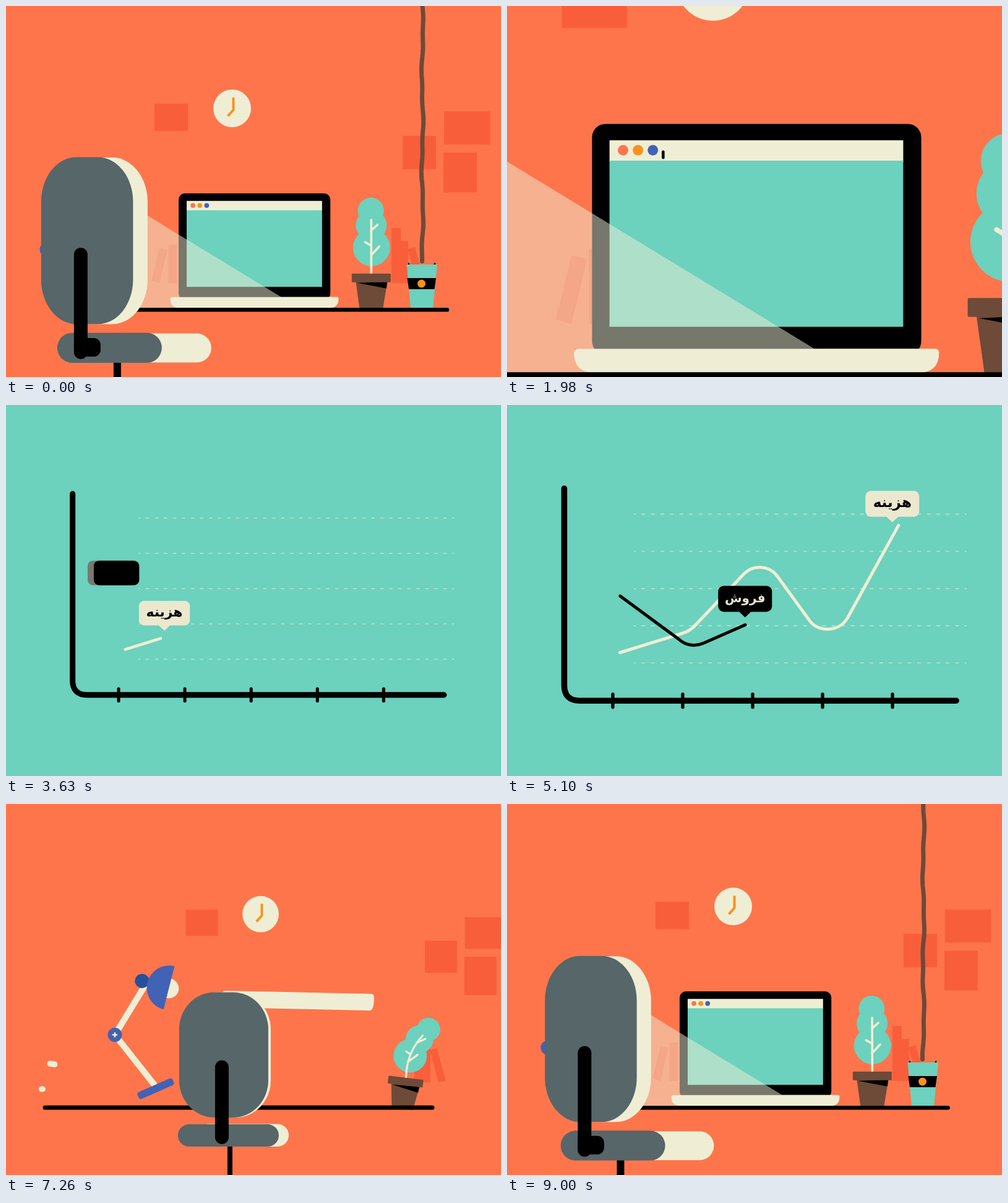
These frames come from a looping animation (800 by 600 pixels, 9030 ms). An HTML page:

```html
<!DOCTYPE html>
<html lang="fa">
<head>
<meta charset="utf-8">
<title>Desk and chart</title>
<style>
html, body { margin: 0; width: 100%; height: 100%; overflow: hidden; background: #fe754b; }
svg { display: block; width: 100vw; height: 100vh; }
text { font-family: "DejaVu Sans", "Noto Sans", sans-serif; font-weight: bold; text-anchor: middle; direction: rtl; }
.line { fill: none; stroke-linecap: round; stroke-linejoin: round; }
</style>
</head>
<body>
<svg id="stage" viewBox="0 0 800 600" preserveAspectRatio="none"></svg>
<script>
const LOOP = 9030;
const C = { wall: '#fe754b', red: '#f95e3b', teal: '#6cd1bd', cream: '#efeed5', label: '#ebe8cf',
  grey: '#566669', brown: '#6e4a38', blue: '#4262b5', navy: '#274f9b', amber: '#f7931e', black: '#000' };

const clamp = v => Math.max(0, Math.min(1, v));
const mix = (a, b, u) => a + (b - a) * u;
const span = (t, a, b) => clamp((t - a) / (b - a));
const easeInOut = u => u < .5 ? 2 * u * u : 1 - 2 * (1 - u) ** 2;
const easeOut = u => 1 - (1 - u) ** 3;
const backOut = u => 1 + 2.7 * (u - 1) ** 3 + 1.7 * (u - 1) ** 2;

const rect = (x, y, w, h, fill, r = 0, more = '') =>
  `<rect x="${x}" y="${y}" width="${w}" height="${h}" rx="${r}" fill="${fill}" ${more}/>`;
const circle = (x, y, r, fill) => `<circle cx="${x}" cy="${y}" r="${r}" fill="${fill}"/>`;
const poly = (points, fill, more = '') => `<polygon points="${points}" fill="${fill}" ${more}/>`;
const line = (d, color, w, more = '') => `<path class="line" d="${d}" stroke="${color}" stroke-width="${w}" ${more}/>`;
const group = (id, body = '') => `<g id="${id}">${body}</g>`;

const wall = rect(240, 158, 54, 44, C.red) + rect(641, 210, 54, 54, C.red) +
  rect(708, 170.5, 74.5, 53.5, C.red) + rect(707, 237, 54, 64.5, C.red) +
  circle(365.5, 165.5, 30.5, C.cream) + line('M367.5 148V168L358.5 178', C.amber, 4, 'style="stroke-linecap:butt"') +
  poly('248,391 261,394 248,448 235,444', C.red) + rect(262.5, 385.5, 13.5, 62.5, C.red) +
  rect(284.5, 370, 16, 78, C.red) + rect(623, 359, 15, 89, C.red) + rect(638, 380, 12, 68, C.red) +
  poly('649,393 661,390 676,445 664,448', C.red);

const lid = rect(279, 303, 245.2, 172, C.black, 10) + rect(292, 315.2, 218.8, 16, C.cream) +
  rect(292, 330.4, 218.8, 123.8, C.teal) +
  circle(302.1, 322.6, 3.9, C.wall) + circle(313.2, 322.6, 3.9, C.amber) + circle(324.3, 322.6, 3.9, C.blue);

const cup = poly('649.5,418 650.5,414.5 653,418', C.black) + poly('691,418 693.5,414.5 694.5,418', C.black) +
  poly('647.5,418 697,418 690,489 654,489', C.teal) +
  poly('648.5,440 695,440 692.5,458 651,458', C.black) + circle(671.5, 449, 6.5, C.amber);

// Rounded tray with separate top and bottom corner radii
function tray(x1, y1, x2, y2, top, bottom) {
  return `M${x1 + top} ${y1}H${x2 - top}Q${x2} ${y1} ${x2} ${y1 + top}Q${x2} ${y2} ${x2 - bottom} ${y2}` +
    `H${x1 + bottom}Q${x1} ${y2} ${x1} ${y1 + top}Q${x1} ${y1} ${x1 + top} ${y1}Z`;
}

const tag = (id, word, size, fill, ink) => group(id,
  rect(-43.5, -51, 87, 42, fill, 9, `id="${id}Box"`) +
  `<g id="${id}Text">${poly('-10.5,-10 10.5,-10 0,0', fill)}<text y="-24.5" font-size="${size}" fill="${ink}">${word}</text></g>`);

const costPath = 'M182.5 400.5L284 369C292 366.5 297 364 303 357.5L383 273C398 258 424 259 437 277' +
  'L490 350C503 367 536 368 550 345L635 190.5';
const salesPath = 'M183 309L278 379C287 387.5 302 392 318 385L384 356C400 349 414 348 427 360' +
  'L513 434C522 440.5 526 441.5 537 443L635 457';

const chart =
  group('grid', [176.5, 236.6, 296.8, 357, 417.2].map(y =>
    line(`M205 ${y}H743`, C.cream, 1.8,
      'stroke-opacity=".5" stroke-dasharray="6.4 8.97" stroke-dashoffset="3.2" style="stroke-linecap:butt"')).join('')) +
  line('M92.5 135V453.2Q92.5 478.2 117.5 478.2H726', C.black, 9.6, 'id="axis"') +
  [0, 1, 2, 3, 4].map(i => line('', C.black, 5.3, `id="tick${i}"`)).join('') +
  line(costPath, C.cream, 5, 'id="cost"') + line(salesPath, C.black, 5, 'id="sales"') +
  rect(0, 0, 0, 42, '#777a70', 9, 'id="ghost"') +
  tag('costTag', 'هزینه', 23, C.label, C.black) + tag('salesTag', 'فروش', 20, C.black, C.label);

document.getElementById('stage').innerHTML =
  rect(0, 0, 800, 600, C.wall) + group('wall', wall) +
  group('world',
    group('lid', lid) + group('plant') + line('', C.brown, 7, 'id="pour"') + group('cup', cup) + group('lamp') +
    `<path id="base" fill="${C.cream}"/>`) +
  rect(0, 0, 0, 0, C.teal, 0, 'id="panel"') + group('chart', chart) +
  poly('150,291 444.5,470.5 266,470.5 267,480 277,489 100,489', C.cream, 'id="light"') +
  line('', C.black, 6, 'id="desk"') + group('bits') + group('chair');

const el = {};
document.querySelectorAll('[id]').forEach(node => el[node.id] = node);
const set = (id, attrs) => { for (const k in attrs) el[id].setAttribute(k, attrs[k]); };
const show = (id, on) => el[id].style.display = on ? '' : 'none';
const lengths = { axis: 0, cost: 0, sales: 0 };
for (const id in lengths) lengths[id] = el[id].getTotalLength();

function reveal(id, u) {
  const len = lengths[id];
  show(id, u > 0);
  set(id, { 'stroke-dasharray': `${len * u} ${len + 20}` });
}

// Slow drift, then the dolly into the laptop screen
const zoomAt = t => t > 6000 ? 1 : Math.exp(.012 * clamp(t / 600) + 1.427 * easeInOut(span(t, 620, 3250)));
const chartScaleAt = t => t < 3250 ? zoomAt(t) / 4.515 : 1 + (t - 5100) * 3.57e-5;
const panAt = t => t < 6080 ? 0 : 218.7 * ((t - 6080) / 610) ** 2.4;
const about = (x, y, s) => `translate(${x * (1 - s)} ${y * (1 - s)}) scale(${s})`;

function drawWall(t, zoom) {
  let s, slide = 0;
  if (t < 6000) s = 1 / (1 - (1 - 1 / zoom) / 1.109);
  else {
    s = 1 - (LOOP - t) * 2.04e-5;
    slide = 498 * Math.exp(-(t - 6690) / 237);
  }
  set('wall', { transform: `translate(${slide} ${Math.min(5, slide * .11)}) ${about(400, 378, s)}` });
}

function drawPlant(t) {
  const arriving = t > 6000;
  const age = t - 7260;
  const far = arriving ? Math.exp(-age / 200) : 0;
  const sway = arriving ? Math.min(1, Math.exp(-age / 350)) * (age > 0 ? Math.cos(age / 110) : 1) : 0;
  const bend = .0044 * sway;
  const s = 1 - .1 * Math.min(1, far);
  const at = (x, h) => [x * s + bend * (h * s) ** 2, -h * s * (1 - .37 * Math.abs(bend) * h * s)];
  const leaf = (x, h, r) => circle(...at(x, h), r * s, C.teal);
  const twig = (...pts) => line('M' + pts.map(p => at(...p).join(' ')).join('L'), C.cream, 3.6 * s);
  const stem = [0, 15, 30, 45, 60, 75, 87].map(h => [0, h]);
  const pot = `<g transform="scale(${s})">` + poly('-25,13 26,13 19,56 -19,56', C.brown) +
    poly('-23,15 26,13 24.5,24', C.black) + rect(-31.5, 0, 63, 14, C.brown, 1) + '</g>';
  el.plant.innerHTML = `<g transform="translate(${590.3 + 56.5 * far} ${432.8 + 10 * Math.min(1, far)})">` +
    leaf(-.7, 102, 21) + leaf(0, 78, 25) + leaf(.5, 42, 30) + twig(...stem) +
    twig([0, 70], [10, 79]) + twig([0, 45], [-10, 51]) + twig([0, 30], [13, 44]) +
    `<g transform="rotate(${7 * sway})">${pot}</g></g>`;
}

function drawLaptop(t) {
  const landing = t > 6000;
  const fall = landing ? span(t, 7260, 7470) ** 2 : 1;
  const near = landing ? easeOut(span(t, 7260, 7560)) : 1;
  const y = landing && t < 7260 ? 318 - (7260 - t) * 1.2 : mix(318, 479.5, fall);
  const x = mix(473, 401.5, near);
  set('base', {
    d: tray(-136, -9, 136, 9, mix(5, 3, near), mix(7, 16, near)),
    transform: `translate(${x} ${y}) rotate(${1.2 * (1 - fall)}) scale(${mix(.9, 1, near)} ${mix(1.5, 1, near)})`
  });
  const open = landing ? backOut(span(t, 7480, 7860)) : 1;
  show('lid', open > 0);
  set('lid', { transform: `translate(0 473) scale(1 ${open}) translate(0 -473)` });
}

function drawLamp(t) {
  const slide = t < 6000 ? 1 : span(t, 7260, 8600);
  const land = t < 6000 ? 1 : backOut(span(t, 7260, 7620));
  const drop = t > 6000 && t < 7260 ? -(7260 - t) * 1.6 : 0;
  const jx = mix(176, 66, slide), jy = mix(373, 394, land) + drop;
  const bx = jx + 66, by = jy + mix(87, 89, land);
  const hx = jx + mix(87.5, 92, land), hy = jy - 76;
  el.lamp.innerHTML =
    line(`M${hx - 40} ${hy - 2}L${jx} ${jy}L${bx - 2} ${by - 6}`, C.cream, 10) +
    `<g transform="translate(${bx} ${by}) rotate(${mix(-24, 0, land)})">${rect(-31, -6, 62, 12, C.blue, 4)}</g>` +
    `<g transform="translate(${hx} ${hy}) rotate(${mix(14, 30, land)})">` +
    circle(-45, 0, 11.5, C.navy) + circle(0, 1, 16, C.cream) +
    `<path d="M0 -36A36 36 0 0 0 0 36Z" fill="${C.blue}"/></g>` +
    circle(jx, jy, 11.5, C.blue) + line(`M${jx - 3} ${jy}h6M${jx} ${jy - 3}v6`, C.cream, 2.5);
}

function drawCup(t) {
  const grow = t < 6000 ? 1 : backOut(span(t, 7950, 8300));
  show('cup', grow > 0);
  set('cup', { transform: `translate(672 489) scale(${grow}) translate(-672 -489)` });
  const fall = t < 6000 ? 1 : span(t, 8430, 8640) ** 2;
  show('pour', fall > 0);
  let d = '';
  const end = mix(-10, 418, fall);
  for (let y = -420; y <= end; y += 7)
    d += `${d ? 'L' : 'M'}${673 + .6 * Math.sin((y - t * .7) / 9) + 1.1 * Math.sin(y / 24)} ${y}`;
  set('pour', { d });
}

function drawLight(t, zoom) {
  const glow = t < 6000 ? 1 - span(t, 2120, 2500) : span(t, 8300, 8480);
  show('light', glow > 0);
  set('light', { opacity: .5 * glow, transform: about(400, 399, zoom) });
}

function drawChair(t) {
  const leaving = t < 6000;
  const u = leaving ? 1 : (t - 7260) / (LOOP - 7260);
  const k = leaving ? 1 : u < 0 ? 0 : .82 * u + .18 * u * u;
  const part = (from, to, fill, rx, ry) => {
    const [x, y, w, h] = from.map((v, i) => mix(v, to[i], k));
    return rect(x, y, w, h, fill, rx ?? Math.min(w, h) / 2, ry ? `ry="${ry}"` : '');
  };
  const rx = 57, ry = mix(60, 72, k);
  el.chair.innerHTML =
    part([358, 540, 8, 90], [174, 565, 12, 90], C.black, 0) +
    part([310, 517.5, 147, 36.5], [150, 529.5, 182, 47], C.cream) +
    part([278, 518, 163, 36], [83, 528.5, 169, 48.5], C.grey) +
    part([284, 304.5, 144, 202.5], [80, 245, 149, 269.5], C.cream, rx, ry) +
    part([280, 304.5, 144, 202.5], [57, 244.5, 148.5, 270], C.grey, rx, ry) +
    part([340, 525, 18, 23], [110, 537, 43, 30], C.black, 11) +
    part([338, 414.5, 22, 135.5], [110, 391, 22, 180], C.black);
  const dx = leaving ? -(.15 * t + .0002 * t * t) : 0;
  const dy = leaving ? 0 : 320 * (1 - easeOut(span(t, 6930, 7240)));
  set('chair', { transform: `${about(400, 399, zoomAt(t))} translate(${dx} ${dy})` });
}

function drawDesk(t, zoom) {
  show('desk', t < 2300 || t > 6080);
  if (t < 6000) {
    set('desk', { d: 'M120 491.3H713', 'stroke-width': 6.4, transform: about(400, 399, zoom) });
    return;
  }
  const pan = span(t, 6690, 7260), rest = span(t, 7260, LOOP);
  const x1 = t < 7260 ? 63 - (7260 - t) * .2 : mix(63, 120, rest);
  const x2 = mix(mix(mix(738, 727.5, span(t, 6080, 6690)), 689, pan), 713, rest);
  const c = Math.min(chartScaleAt(t), 1.0568);
  const y = mix(mix(300 + 178.2 * c, 491, pan), 491.3, rest);
  set('desk', { d: `M${x1} ${y}H${x2}`, 'stroke-width': mix(mix(10, 7, pan), 6.4, rest), transform: '' });
}

function drawPanel(t, c, zoom) {
  show('panel', t > 2120 && t < 7400);
  if (t > 2800) {
    const edge = 400 + 476.6 * c - panAt(t);
    set('panel', { x: -20, y: 0, width: Math.max(0, edge + 20), height: 600 });
    return;
  }
  const u = easeInOut(span(t, 2120, 2790));
  const px = x => 400 + zoom * (x - 400), py = y => 399 + zoom * (y - 399);
  const x = mix(px(292), Math.min(0, px(292)), u), y = mix(py(330.4), 0, u);
  const right = mix(px(510.8), Math.max(800, px(510.8)), u), bottom = mix(py(454.2), 600, u);
  set('panel', { x, y, width: right - x, height: bottom - y });
}

function placeTag(id, path, u, offset, pop) {
  const p = el[path].getPointAtLength(lengths[path] * u);
  const [dx, dy] = [mix(8, -10, u), mix(...offset, u)];
  show(id, pop > 0);
  set(id, { transform: `translate(${p.x + dx} ${p.y + dy}) scale(${pop})` });
}

function drawChart(t, c) {
  const on = t > 1880 && t < 7400;
  show('chart', on);
  if (!on) return;
  const settle = easeInOut(span(t, 1980, 3250));
  set('chart', { transform: `translate(${mix(391, 381, settle) - panAt(t)} ${mix(315, 300, settle)}) scale(${c}) translate(-381 -300)` });
  reveal('axis', easeInOut(span(t, 1880, 2880)));
  for (let i = 0; i < 5; i++) {
    const h = 10.5 * backOut(span(t, 2500 + i * 90, 2720 + i * 90));
    const x = 171 + 113 * i;
    show('tick' + i, h > .1);
    set('tick' + i, { d: `M${x} ${478.2 - h}V${478.2 + h}` });
  }
  set('grid', { opacity: span(t, 2850, 3250) });

  const cost = easeInOut(span(t, 3176, 5229));
  const sales = easeInOut(span(t, 4125, 6178));
  reveal('cost', cost);
  reveal('sales', sales);
  placeTag('costTag', 'cost', cost, [-14, -5], backOut(span(t, 2980, 3200)));

  // The second tag slides out from the axis with a short trail
  const enter = span(t, 3540, 3690);
  placeTag('salesTag', 'sales', sales, [-9, -16], enter > 0 ? 1 : 0);
  const w = mix(45, 87, easeOut(enter) ** 4.1);
  const mid = mix(-55, 0, easeOut(enter) ** 10.2 * .45 + enter * .55);
  set('salesTagBox', { x: mid - w / 2, width: w });
  set('salesTagText', { opacity: span(t, 3660, 3780) });
  show('ghost', enter > 0 && enter < 1);
  set('ghost', { x: 191 + mid - w / 2 - 10.5, y: 249, width: w });
}

function drawBits(t) {
  const d = (t - 7260) * .12;
  show('bits', t > 7170 && t < 7400);
  el.bits.innerHTML =
    `<g transform="translate(${75 - d} ${420.5 - d * .4}) rotate(8)">${rect(-8.5, -4.7, 17, 9.4, C.cream, 4.5)}</g>` +
    `<g transform="translate(${58.5 - d} ${461 + d * .1})">${rect(-5.5, -4.5, 11, 9, C.cream, 4.5)}</g>`;
}

function render(t) {
  const zoom = zoomAt(t), c = chartScaleAt(t);
  const inRoom = t < 2800 || t > 6750;
  drawWall(t, zoom);
  show('world', inRoom);
  if (inRoom) {
    set('world', { transform: about(400, 399, zoom) });
    drawPlant(t);
    drawLaptop(t);
    drawLamp(t);
    drawCup(t);
  }
  drawPanel(t, c, zoom);
  drawChart(t, c);
  drawLight(t, zoom);
  drawDesk(t, zoom);
  drawBits(t);
  show('chair', t < 1900 || t > 6930);
  drawChair(t);
}

const start = performance.now();
function tick() {
  render((performance.now() - start) % LOOP);
  requestAnimationFrame(tick);
}
render(0);
requestAnimationFrame(tick);
</script>
</body>
</html>
```
